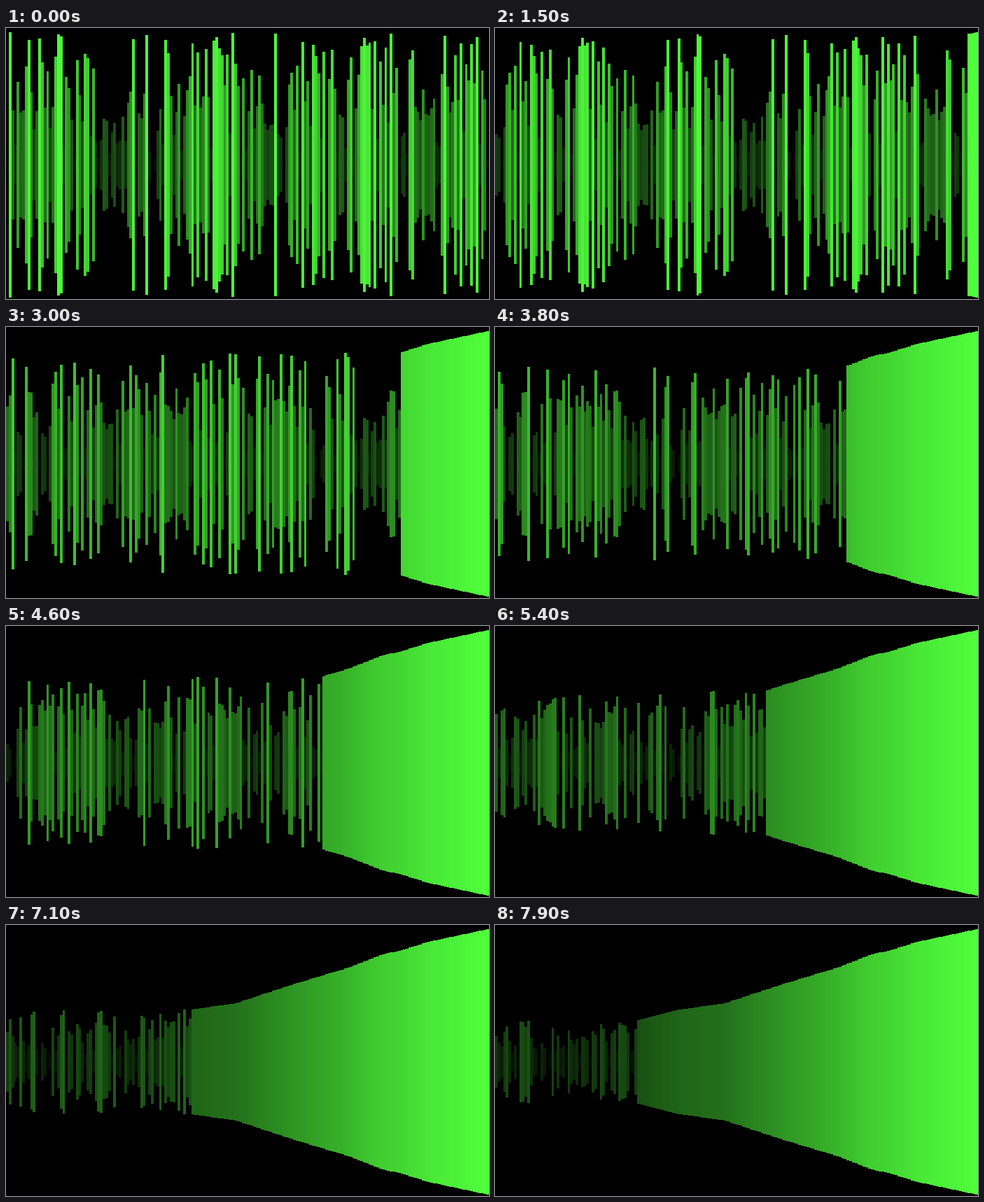
An HTML page with a canvas that plays this animation: 690 by 388 pixels, repeating every 8 s.

```html
<!DOCTYPE html>
<html lang="en">
<head>
<meta charset="utf-8">
<title>Pancake sort</title>
<style>
  html, body { margin: 0; width: 100%; height: 100%; overflow: hidden; background: #000; }
  canvas { display: block; }
</style>
</head>
<body>
<canvas id="stage" width="690" height="388"></canvas>
<script>
const WIDTH = 690, HEIGHT = 388, MIDDLE = 196, MAX_HALF = 190;
const COUNT = 180, LOOP = 8000, STEP = 100;
const ctx = document.getElementById('stage').getContext('2d');

// Starting places of the tallest bars, tallest first, and centres of the low stretches
const tallest = [1, 84, 100, 143, 19, 52, 163, 20, 175, 78, 133, 12, 47, 59, 8, 77, 137, 110, 135, 169];
const valleys = [38, 42, 54, 98];

// [x, half height] along the fully sorted outline
const outline = [[0, 2], [204, 59], [260, 74], [330, 84], [412, 111], [488, 134], [543, 155], [564, 159], [606, 172], [690, 190]];

// [time in ms, finished passes]
const progress = [[0, 0], [1260, 0], [3800, 49.2], [4600, 62.5], [7900, 127.5]];

function interpolate(points, x) {
  const i = Math.max(1, points.findIndex(p => p[0] >= x));
  const [x0, y0] = points[i - 1], [x1, y1] = points[i];
  return y0 + (y1 - y0) * (x - x0) / (x1 - x0);
}

function seeded(seed) {
  return () => (seed = (seed * 16807) % 2147483647) / 2147483647;
}

function shuffledBars() {
  const random = seeded(4217);
  const keys = Array.from({ length: COUNT }, (_, i) => {
    const low = valleys.some(v => Math.abs(i - v) <= 2);
    return random() * (low ? 0.35 : 1);
  });
  tallest.forEach((place, rank) => { keys[place] = 2 - rank / COUNT; });
  const order = keys.map((_, i) => i).sort((a, b) => keys[a] - keys[b]);
  const bars = [];
  order.forEach((place, rank) => {
    bars[place] = interpolate(outline, (rank + 1) * WIDTH / COUNT);
  });
  return bars;
}

// Reverses the first `length` bars
const flip = (bars, length) => [...bars.slice(0, length).reverse(), ...bars.slice(length)];

// Brings the tallest unsorted bar to the front, then flips it to the end
function pancakePass(bars, unsorted) {
  const top = bars.indexOf(Math.max(...bars.slice(0, unsorted)));
  return top === unsorted - 1 ? bars : flip(flip(bars, top + 1), unsorted);
}

const states = [shuffledBars()];
for (let done = 0; done < 127; done++) {
  states.push(pancakePass(states[done], COUNT - done));
}

function draw(time) {
  const tick = Math.floor(time / STEP) * STEP;
  const bars = states[Math.floor(interpolate(progress, tick))];
  ctx.fillStyle = '#000';
  ctx.fillRect(0, 0, WIDTH, HEIGHT);
  bars.forEach((half, i) => {
    const left = Math.round(i * WIDTH / COUNT);
    const right = Math.round((i + 1) * WIDTH / COUNT);
    const h = Math.round(half), light = half / MAX_HALF;
    ctx.fillStyle = `rgb(${80 * light}, ${255 * light}, ${60 * light})`;
    ctx.fillRect(left, MIDDLE - h, right - left, 2 * h);
  });
}

const start = performance.now();
function frame() {
  draw((performance.now() - start) % LOOP);
  requestAnimationFrame(frame);
}
frame();
</script>
</body>
</html>
```
